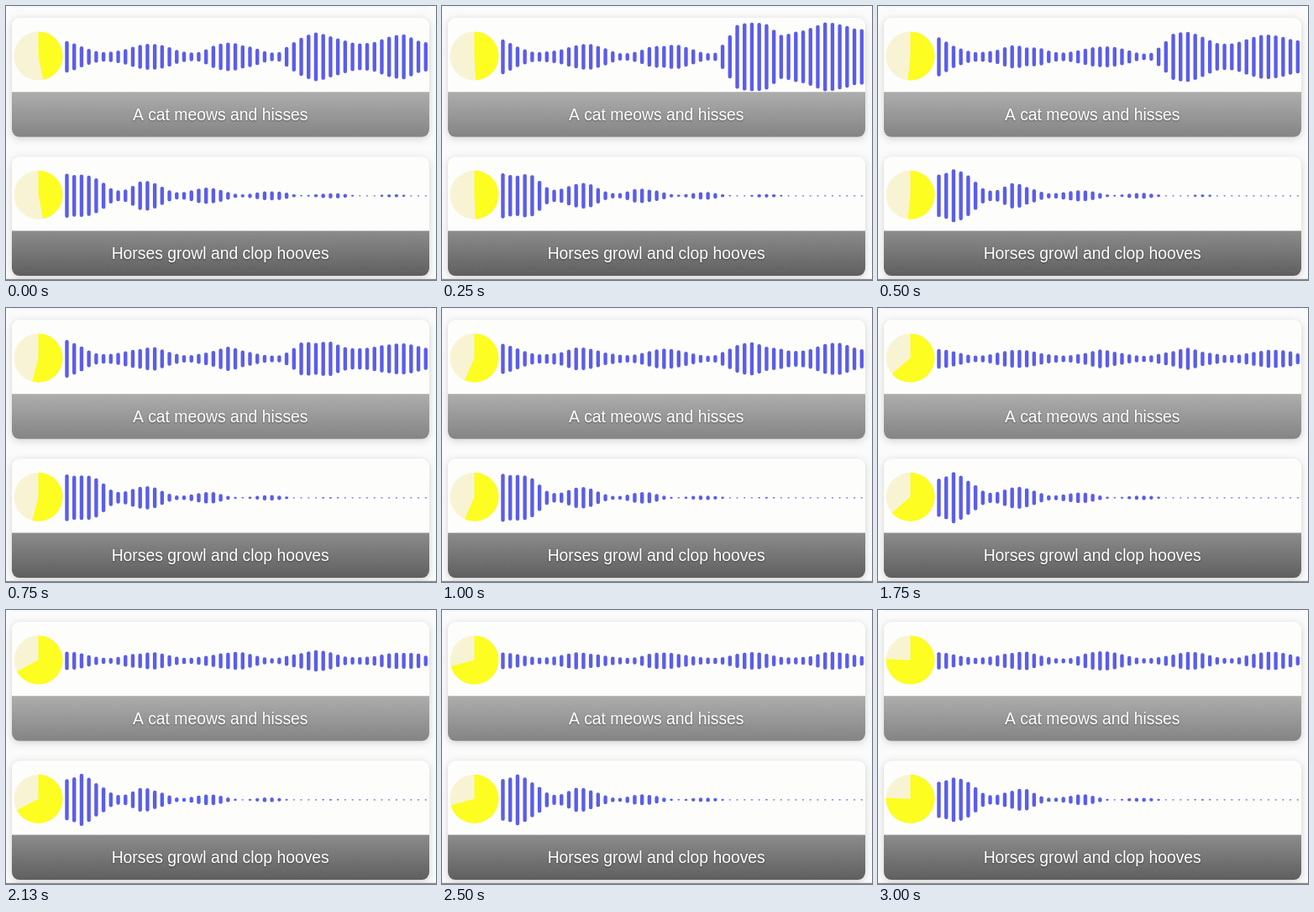
These frames come from a looping animation (512x326 px, 3130 ms). An HTML page with a canvas:

```html
<!DOCTYPE html>
<html lang="en">
<head>
<meta charset="utf-8">
<title>Sound cards</title>
<style>
html, body { margin: 0; width: 100%; height: 100%; overflow: hidden; background: #fbfbfb; }
canvas { display: block; }
</style>
</head>
<body>
<canvas id="stage" width="512" height="326"></canvas>
<script>
const ctx = document.getElementById('stage').getContext('2d');
const LOOP = 3130, STEP = 125, LAST_STEP = 24;
const BARS = 50, BAR_WIDTH = 4.4, BAR_GAP = 8.72;
const CARD = { left: 7, width: 497, height: 141.8, labelTop: 88.2, radius: 9 };

const cards = [
  { top: 14, label: 'A cat meows and hisses', shade: ['#adadad', '#848484'], level: catLevel, seed: 3 },
  { top: 179.3, label: 'Horses growl and clop hooves', shade: ['#8c8c8c', '#5f5f5f'], level: horseLevel, seed: 47 }
];

const lerp = (a, b, t) => a + (b - a) * t;
const clamp01 = v => Math.min(1, Math.max(0, v));
const bump = (v, center, width) => Math.exp(-(((v - center) / width) ** 2));
const wave = (v, peak, period) => Math.cos((v - peak) / period * Math.PI * 2);

function random(n) {
  const v = Math.sin(n * 12.9898) * 43758.5453;
  return v - Math.floor(v);
}

// Seeded noise from -1 to 1, smooth along the bars and new in every step.
function flutter(bar, step, seed) {
  const x = bar / 2, cell = Math.floor(x), base = cell + step * 61 + seed;
  return lerp(random(base), random(base + 1), x - cell) * 2 - 1;
}

// Even ripples with a strong attack; the right part swells early and calms down.
function catLevel(bar, time) {
  const body = 13 + 8 * Math.exp(-time / 1.2);
  const attack = 16 * bump(time, 0.8, 0.8) * Math.exp(-bar / 2.5);
  const swell = 8 * Math.exp(-time) + 38 * bump(time, 0.25, 0.25) + 10 * bump(time, 0.75, 0.4);
  return body * (1 + 0.5 * wave(bar, 11, 11.5)) + attack + swell * clamp01((bar - 29) / 3);
}

// A loud start that dies away in ripples.
function horseLevel(bar, time) {
  const tail = 13 + 6 * Math.exp(-time / 0.3);
  const depth = 0.32 * clamp01(bar / 6);
  const ripple = 1 - depth * (1 - wave(bar, 2.8, 8.4));
  return 58 * Math.exp(-Math.abs(bar - 2) / tail) * ripple - 2.5 * clamp01(bar / 10);
}

function fillRound(x, y, w, h, radii) {
  ctx.beginPath();
  ctx.roundRect(x, y, w, h, radii);
  ctx.fill();
}

function setShadow(color, blur, offsetY) {
  ctx.shadowColor = color;
  ctx.shadowBlur = blur;
  ctx.shadowOffsetY = offsetY;
}

function drawPie(x, y, angle) {
  const start = -Math.PI / 2;
  ctx.fillStyle = '#f8f4d3';
  ctx.beginPath();
  ctx.arc(x, y, 29, 0, Math.PI * 2);
  ctx.fill();
  ctx.fillStyle = '#fdfd22';
  ctx.beginPath();
  ctx.moveTo(x, y);
  ctx.arc(x, y, 29, start, start + angle * Math.PI / 180);
  ctx.fill();
}

function drawBars(card, step, centerY) {
  ctx.fillStyle = '#5b5de9';
  for (let bar = 0; bar < BARS; bar++) {
    const level = card.level(bar, step * STEP / 1000);
    const h = Math.max(1.2, level * (1 + 0.15 * flutter(bar, step, card.seed)));
    const w = Math.min(BAR_WIDTH, h + 1);
    fillRound(72.5 + bar * BAR_GAP - w / 2, centerY - h / 2, w, h, Math.min(w, h) / 2);
  }
}

function drawLabel(card) {
  const { left, width, height, labelTop, radius } = CARD;
  const gradient = ctx.createLinearGradient(0, card.top + labelTop, 0, card.top + height);
  card.shade.forEach((color, i) => gradient.addColorStop(i, color));
  ctx.fillStyle = gradient;
  fillRound(left, card.top + labelTop, width, height - labelTop, [0, 0, radius, radius]);

  setShadow('rgba(0,0,0,0.4)', 2, 1);
  ctx.fillStyle = '#fff';
  ctx.fillText(card.label, 255.2, card.top + 122);
  setShadow('transparent', 0, 0);
}

function drawCard(card, step) {
  setShadow('rgba(0,0,0,0.17)', 9, 2);
  ctx.fillStyle = '#fdfdfc';
  fillRound(CARD.left, card.top, CARD.width, CARD.height, CARD.radius);
  setShadow('transparent', 0, 0);

  drawLabel(card);
  drawPie(38.5, card.top + 45.4, 168.5 + step * STEP / 1000 * 34.6);
  drawBars(card, step, card.top + 46.5);
}

function draw(time) {
  const step = Math.min(LAST_STEP, Math.floor((time % LOOP) / STEP));
  ctx.fillStyle = '#fbfbfb';
  ctx.fillRect(0, 0, 512, 326);
  ctx.fillStyle = '#f5f5f5';
  ctx.fillRect(8, 0, 495, 2);
  ctx.font = '19.35px "Liberation Sans", Arial, sans-serif';
  ctx.textAlign = 'center';
  cards.forEach(card => drawCard(card, step));
  ctx.fillStyle = '#858585';
  ctx.fillRect(0, 324.8, 512, 1.2);
}

const started = performance.now();
function tick() {
  draw(performance.now() - started);
  requestAnimationFrame(tick);
}
tick();
</script>
</body>
</html>
```
